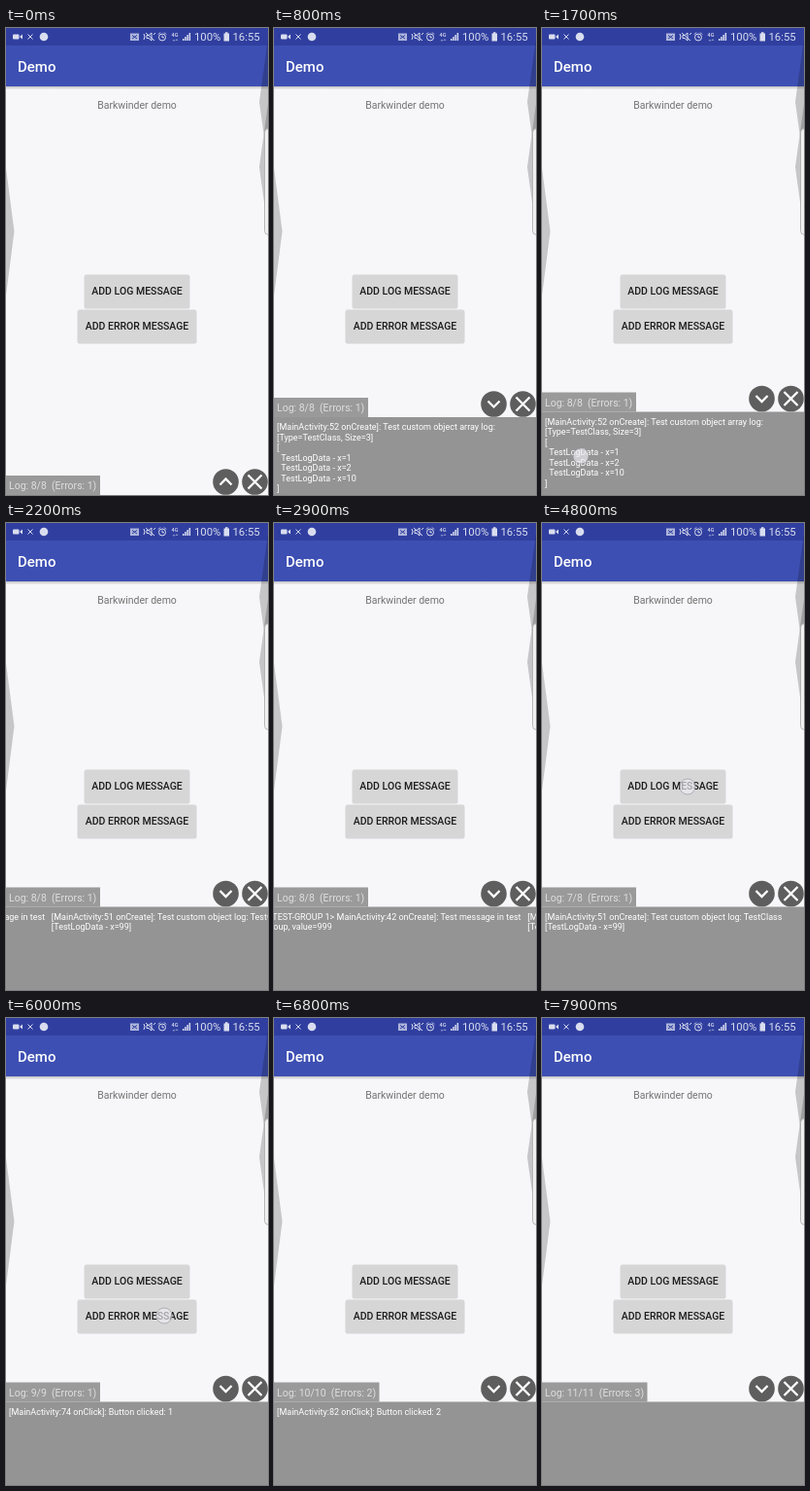
Write an HTML page that moves like this. It is 270 px wide and 480 px high and loops after 8 s.

```html
<!DOCTYPE html>
<html lang="en">
<head>
<meta charset="utf-8">
<title>Log overlay demo</title>
<style>
html, body { margin: 0; height: 100%; overflow: hidden; }
svg { display: block; width: 100vw; height: 100vh; font-family: Roboto, sans-serif; font-size: 10.5px; }
text { white-space: pre; }
.mid { text-anchor: middle; }
.btn { font-weight: 500; fill: #1c1c1c; }
.line { fill: none; stroke: #fff; }
.log { font-size: 9px; fill: #fff; }
</style>
</head>
<body>
<svg viewBox="0 0 270 480">
  <defs>
    <linearGradient id="shade" x2="0" y2="1">
      <stop stop-color="#000" stop-opacity=".22"/>
      <stop offset="1" stop-color="#000" stop-opacity="0"/>
    </linearGradient>
  </defs>
  <rect width="270" height="480" fill="#f7f6f8"/>
  <rect width="270" height="60" fill="#3d4fb3"/>
  <rect width="270" height="18" fill="#303f9f"/>
  <rect y="60" width="270" height="3.5" fill="url(#shade)"/>

  <!-- status bar -->
  <g fill="#d9ddef">
    <rect x="7" y="6.500" width="6.500" height="5" rx="1"/>
    <path d="M14 9l3-2.5v5z"/>
    <circle cx="39" cy="9" r="4.3"/>
    <path d="M128 5.500h9v7.500h-9z" opacity=".75"/>
    <path d="M182 11h1.500v2h-1.500zM184.200 9h1.500v4h-1.500zM186.400 7h1.500v6h-1.500zM188.600 5h1.500v8h-1.500z"/>
    <path d="M224.500 5.500h1.500v-1.300h2.500v1.300h1.500v8h-5.500z"/>
    <text x="170.500" y="9" font-size="5.500" font-weight="500">4G</text>
    <path d="M171.500 12l1.500 2 1.500-2zM174.500 13l1.500-2 1.500 2z" opacity=".5"/>
    <g font-size="11.3">
      <text x="194" y="13">100%</text>
      <text x="233.500" y="13">16:55</text>
    </g>
  </g>
  <g class="line" style="stroke: #d9ddef">
    <path d="M22.500 6.500l5 5m0-5l-5 5"/>
    <path d="M130 7.500l5 3.500m0-3.500l-5 3.500" stroke="#303f9f" style="stroke: #303f9f"/>
    <path d="M142 6q2 3 0 6M145 7.500h2l3-2.500v8l-3-2.500h-2zM144 5l9 8M152 7l2-2"/>
    <circle cx="161" cy="9.500" r="3.500"/>
    <path d="M161 7.500v2.300h2M157 6.500l2-2m4 0l2 2"/>
  </g>

  <text x="12" y="45" font-size="15" font-weight="500" fill="#fff">Demo</text>
  <text class="mid" x="135" y="83.300" fill="#737373">Barkwinder demo</text>

  <!-- edge handles -->
  <g fill-opacity=".2">
    <path d="M0 144l8.500 65L0 275z"/>
    <path d="M270 11l-9 65 9 65z"/>
    <path d="M270 78l-9 65 9 65z"/>
  </g>
  <rect x="266.500" y="103.500" width="12" height="109" rx="4" fill="#f1f1f2" stroke="#a9a9a9" stroke-width=".8"/>

  <!-- buttons -->
  <g fill="#000" opacity=".13">
    <rect x="80.500" y="254" width="109" height="34.500" rx="2"/>
    <rect x="73.500" y="290" width="123" height="34.500" rx="2"/>
  </g>
  <g fill="#d6d6d6">
    <rect x="81" y="253.500" width="108" height="33.500" rx="1.500"/>
    <rect x="74" y="289.500" width="122" height="33.500" rx="1.500"/>
  </g>
  <text class="mid btn" x="135" y="274.300">ADD LOG MESSAGE</text>
  <text class="mid btn" x="135" y="310.300">ADD ERROR MESSAGE</text>

  <!-- overlay, its own top edge at y = 0 -->
  <g id="overlay">
    <rect id="tab" height="20" fill="#9a9a9a"/>
    <text id="count" x="3" y="14.300" fill="#dedede"></text>
    <rect y="20" width="270" height="90" fill="#949494"/>
    <g id="pages"></g>
    <g fill="#5e5e5e">
      <circle cx="226.500" cy="6.500" r="13.300"/>
      <circle cx="256.500" cy="6.500" r="13.300"/>
    </g>
    <g class="line" stroke-width="2.300">
      <path id="arrow" d="M-6 3L0-3l6 6"/>
      <path d="M249.500-.5l14 14m0-14l-14 14"/>
    </g>
  </g>
  <circle id="touch" r="8" fill="#ececf4" fill-opacity=".65" stroke="#90909a" stroke-opacity=".6"/>
</svg>
<script>
const LOOP = 8000, STEP = 100, PAGE = 270;
const $ = id => document.getElementById(id);
const clamp = u => Math.max(0, Math.min(1, u));
const part = (t, a, b) => clamp((t - a) / (b - a));
const easeOut = (u, p) => 1 - (1 - u) ** p;
const smooth = u => u * u * (3 - 2 * u);

function addPage(...lines) {
  const svgEl = name => document.createElementNS("http://www.w3.org/2000/svg", name);
  const page = svgEl("g");
  page.setAttribute("class", "log");
  lines.forEach((line, i) => {
    const text = svgEl("text");
    text.setAttribute("x", 3);
    text.setAttribute("y", 33 + i * 10.55);
    text.textContent = line;
    page.append(text);
  });
  $("pages").append(page);
  return page;
}

const oldPages = [
  addPage("[<TEST-GROUP 1> MainActivity:42 onCreate]: Test message in test", "group, value=999"),
  addPage("[MainActivity:51 onCreate]: Test custom object log: TestClass", "[TestLogData - x=99]"),
  addPage("[MainActivity:52 onCreate]: Test custom object array log:", "[Type=TestClass, Size=3]",
    "[", "  TestLogData - x=1", "  TestLogData - x=2", "  TestLogData - x=10", "]")
];

// button taps: the entry is counted 300 ms later, then its text fades in
const taps = [
  { at: 4700, x: 150, y: 271, count: 9, errors: 1, page: addPage("[MainActivity:74 onClick]: Button clicked: 1") },
  { at: 6000, x: 163, y: 306, count: 10, errors: 2, page: addPage("[MainActivity:82 onClick]: Button clicked: 2") },
  { at: 7600, x: 163, y: 306, count: 11, errors: 3 }
];

// x of the middle page
const scrollAt = t => t < 3300
  ? -PAGE + 2 * PAGE * easeOut(part(t, 1700, 3100), 1.97)
  : PAGE * (1 - smooth(part(t, 3400, 4565)));

function touchAt(t, scroll) {
  if (t >= 500 && t < 700) return [226, 466];
  if (t >= 1700 && t < 2000) return [310 + scroll, 440];
  if (t >= 3300 && t < 3700) return [scroll - 50, 443];
  const tap = taps.find(k => t >= k.at && t < k.at + 200);
  return tap && [tap.x, tap.y];
}

function draw(t) {
  const top = 460 - 85.5 * easeOut(part(t, 600, 900), 2.5);
  $("overlay").setAttribute("transform", `translate(0 ${top})`);
  $("arrow").setAttribute("transform", `translate(226.5 6.5) scale(1 ${t < 600 ? 1 : -1})`);

  const scroll = scrollAt(t);
  const last = taps.filter(k => t >= k.at + 300).pop();
  oldPages.forEach((page, i) => {
    page.setAttribute("transform", `translate(${scroll + (i - 1) * PAGE} 0)`);
    page.setAttribute("opacity", last ? 0 : 1);
  });
  for (const tap of taps) {
    tap.page?.setAttribute("opacity", tap === last ? part(t, tap.at + 300, tap.at + 600) : 0);
  }

  const total = last ? last.count : 8;
  const current = last ? total : t < 3100 ? 8 : t < 4600 ? 6 : 7;
  $("count").textContent = `Log: ${current}/${total}  (Errors: ${last ? last.errors : 1})`;
  $("tab").setAttribute("width", total > 9 ? 108.5 : 97);

  const spot = touchAt(t, scroll);
  $("touch").setAttribute("visibility", spot ? "visible" : "hidden");
  if (spot) $("touch").setAttribute("transform", `translate(${spot})`);
}

function tick(now) {
  draw(Math.floor(now % LOOP / STEP) * STEP);
  requestAnimationFrame(tick);
}
draw(0);
requestAnimationFrame(tick);
</script>
</body>
</html>
```
